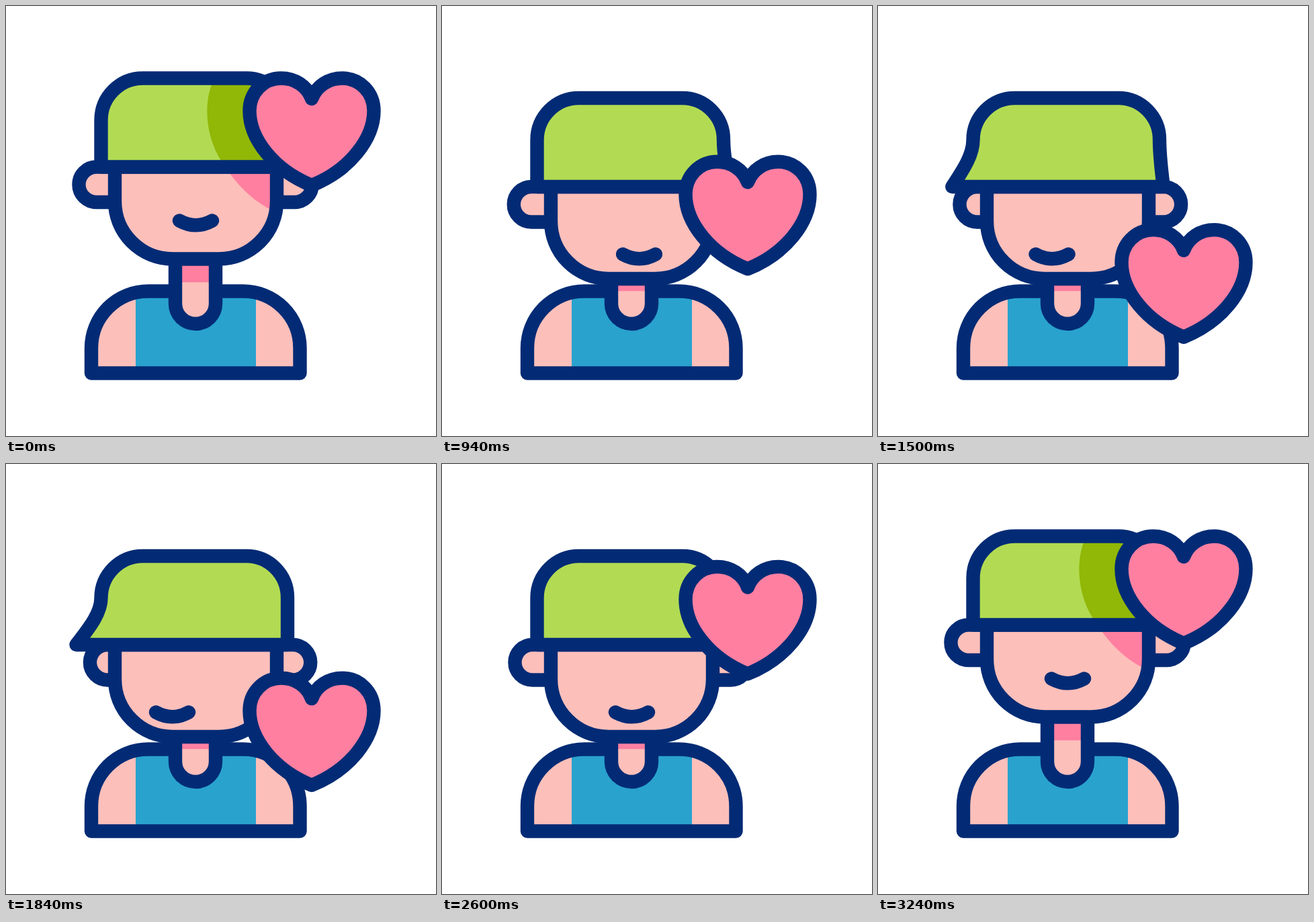
Write an HTML page that moves like this. It is 640 px wide and 640 px high and loops after 3.42 s.

```html
<!DOCTYPE html>
<html lang="en">
<head>
<meta charset="utf-8">
<title>Boy with a heart</title>
<style>
  html, body { margin: 0; width: 100%; height: 100%; overflow: hidden; background: #fff; }
  svg { display: block; width: 100%; height: 100%; }
  .line { stroke: #032b75; stroke-width: 20.4; stroke-linecap: round; stroke-linejoin: round; }
  .none { fill: none; }
  .skin { fill: #fdbfba; }
  .pink { fill: #ff7fa1; }
  .shirt { fill: #29a2ce; }
  .cap { fill: #b2db53; }
  .capShade { fill: #91b707; }
</style>
</head>
<body>
<svg viewBox="0 0 640 640">
  <defs>
    <path id="bodyShape" d="M127 546.5V509A84.5 84.5 0 0 1 211.5 424.5H353A84.5 84.5 0 0 1 437.5 509V546.5Z"/>
    <path id="faceShape" d="M162 239.5V290.5A86 86 0 0 0 248 376.5H317A86 86 0 0 0 403 290.5V239.5Z"/>
    <clipPath id="bodyClip"><use href="#bodyShape"/></clipPath>
    <clipPath id="faceClip"><use href="#faceShape"/></clipPath>
    <clipPath id="capClip"><path id="capClipPath"/></clipPath>
    <path id="shadeShape" d="M306 117C294 150 298 195 320 230C338 259 362 287 394 303L410 303V117Z"/>
  </defs>

  <use href="#bodyShape" class="skin"/>
  <rect class="shirt" x="193" y="424" width="179" height="123" clip-path="url(#bodyClip)"/>
  <use href="#bodyShape" class="line none"/>
  <path class="skin" d="M252 370V443A30 30 0 0 0 312 443V370Z"/>
  <rect id="neckShade" class="pink" x="252" y="360" width="60"/>
  <path class="line none" d="M252 376V443A30 30 0 0 0 312 443V376"/>

  <g id="head">
    <path id="earL" class="line skin" d="M170 239.5H134.7A26.2 26.2 0 0 0 134.7 292H170"/>
    <path id="earR" class="line skin" d="M395 239.5H429.5A26.2 26.2 0 0 1 429.5 292H395"/>
    <use href="#faceShape" class="skin"/>
    <g clip-path="url(#faceClip)"><use href="#shadeShape" class="pink shade"/></g>
    <use href="#faceShape" class="line none"/>
    <path id="capFill" class="cap"/>
    <g clip-path="url(#capClip)"><use href="#shadeShape" class="capShade shade"/></g>
    <path id="capLine" class="line none"/>
  </g>
  <path id="mouth" class="line none" d="M258 319.5Q282.5 333 307 319.5"/>

  <path id="heart" class="line pink" d="M455 138C448 119 430 107.5 409.5 107.5C383 107.5 362.5 129 362.5 156C362.5 198 399 244.5 455 267C511 244.5 547.5 198 547.5 156C547.5 129 527 107.5 500.5 107.5C480 107.5 462 119 455 138Z"/>
</svg>

<script>
  const LOOP = 3420, STEP = 20;
  const el = id => document.getElementById(id);
  const shades = document.querySelectorAll('.shade');
  const move = (id, x, y) => el(id).setAttribute('transform', `translate(${x} ${y})`);

  // Keys are [time, value]; every stretch eases in and out.
  function track(t, keys) {
    if (t <= keys[0][0]) return keys[0][1];
    for (let i = 1; i < keys.length; i++) {
      const [t0, a] = keys[i - 1], [t1, b] = keys[i];
      if (t < t1) {
        const u = (t - t0) / (t1 - t0);
        return a + (b - a) * u * u * (3 - 2 * u);
      }
    }
    return keys[keys.length - 1][1];
  }

  const NOD = [[200, 0], [600, 1], [2800, 1], [3200, 0]];
  const HEART = [[200, 0], [1600, 1], [3000, 0]];
  const RIGHT = [[800, 0], [1200, 1], [1600, 0], [2000, 0], [2270, 1], [2540, 0]];
  const LEFT = [[1200, 0], [1600, 1], [2000, 1], [2270, 0]];

  function capPath(flareL, flareR) {
    const x0 = 141.5, x1 = 419, y = 239.5;
    const l = x0 - flareL, r = x1 + flareR;
    return `M${l} ${y}C${l + flareL / 2} ${y - 24} ${x0} 193 ${x0} 170` +
      `A62 62.5 0 0 1 203.5 107.5H358A61 62 0 0 1 ${x1} 169.5` +
      `C${x1} 193 ${r - flareR / 2} ${y - 24} ${r} ${y}Z`;
  }

  function draw(t) {
    const nod = track(t, NOD), right = track(t, RIGHT), left = track(t, LEFT);
    move('head', 0, 29.5 * nod);
    move('mouth', 39 * right - 35 * left, 50 * nod);
    move('earL', 16.5 * left - 6 * right, 0);
    move('earR', -16 * right - 2.5 * left, 0);
    move('heart', 0, 229 * track(t, HEART));
    const cap = capPath(37 * left, 37 * right);
    for (const id of ['capClipPath', 'capFill', 'capLine']) el(id).setAttribute('d', cap);
    el('neckShade').setAttribute('height', 51.3 + 13 * nod);
    shades.forEach(s => s.setAttribute('opacity', 1 - nod));
  }

  const start = performance.now();
  function tick() {
    const t = (performance.now() - start) % LOOP;
    draw(Math.floor(t / STEP) * STEP);
    requestAnimationFrame(tick);
  }
  tick();
</script>
</body>
</html>
```
